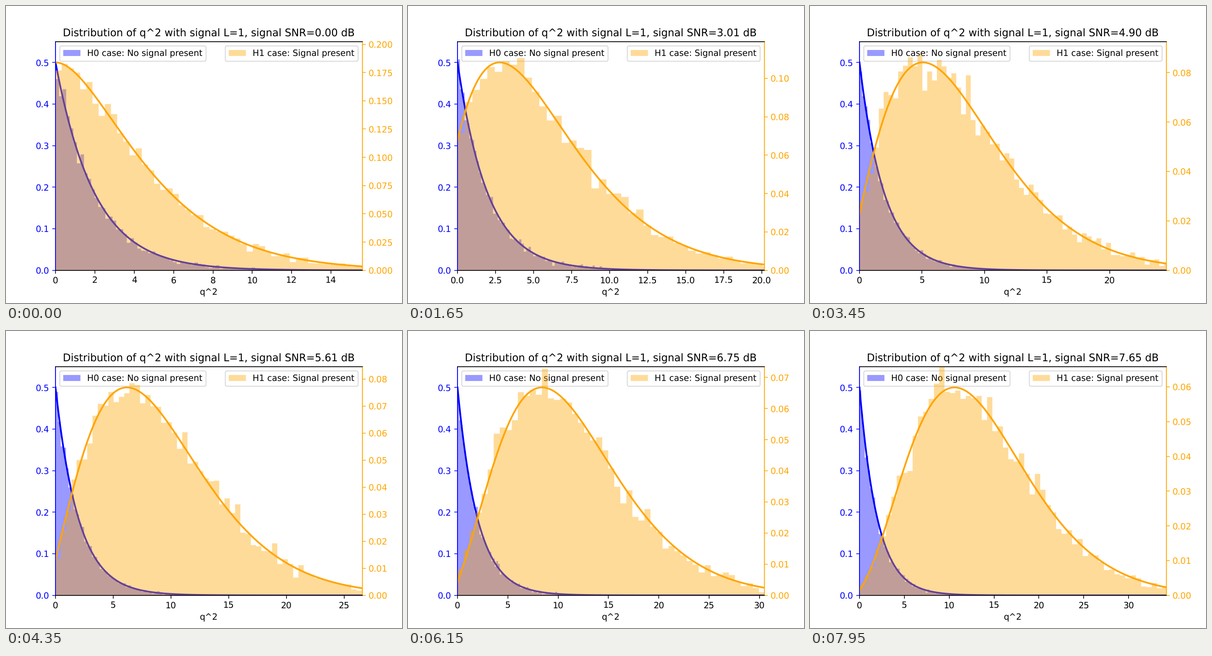
Animation of 864x648 px, one loop 8 s. Source, as a matplotlib script:

```python
import numpy as np
import matplotlib.pyplot as plt
from matplotlib.animation import FuncAnimation

# Sub-pixel placement keeps text widths and edges independent of the dpi.
plt.rcParams.update({'text.hinting': 'none', 'path.snap': False})

STEPS = 54
FRAMES_PER_STEP = 3
SAMPLES = 10_000
BINS = 100
HEADROOM = 1.1
grid = np.linspace(0, 90, 9001)


def noise_pdf(x):
    return 0.5 * np.exp(-x / 2)


def signal_pdf(x, power):
    """Noncentral chi-square density with two degrees of freedom."""
    return 0.5 * np.exp(-(x + power) / 2) * np.i0(np.sqrt(power * x))


def draw_histogram(rng, power):
    re, im = rng.normal(size=(2, SAMPLES))
    q2 = (re + np.sqrt(power)) ** 2 + im ** 2
    return np.histogram(q2, BINS, range=(0, q2.max()), density=True)


def make_state(step):
    snr = 1 + step / 11
    power = 2 * snr
    pdf = signal_pdf(grid, power)
    cdf = np.cumsum((pdf[1:] + pdf[:-1]) / 2) * grid[1]
    rng = np.random.default_rng(step)
    return dict(snr=snr,
                x_max=np.interp(0.99, cdf, grid[1:]),
                y_max=HEADROOM * pdf.max(),
                h0=draw_histogram(rng, 0),
                h1=draw_histogram(rng, power))


states = [make_state(step) for step in range(STEPS)]

fig, ax0 = plt.subplots(figsize=(6.4, 4.8), dpi=135)
ax1 = ax0.twinx()


def add_case(ax, color, label, loc):
    hist = ax.stairs(np.zeros(BINS), np.linspace(0, 1, BINS + 1), fill=True,
                     color=color, alpha=0.4, label=label)
    line, = ax.plot([], [], color=color, lw=2)
    ax.tick_params(axis='y', colors=color)
    ax.legend(loc=loc)
    return hist, line


hist0, line0 = add_case(ax0, 'blue', 'H0 case: No signal present', 'upper left')
hist1, line1 = add_case(ax1, 'orange', 'H1 case: Signal present', 'upper right')
for ax in (ax0, ax1):
    ax.spines['left'].set_color('blue')
    ax.spines['right'].set_color('orange')
ax0.set_ylim(0, HEADROOM * noise_pdf(0))
ax0.set_xlabel('q^2')
title = ax0.set_title('')


def update(frame):
    s = states[frame // FRAMES_PER_STEP]
    x = np.linspace(0, s['x_max'], 400)
    hist0.set_data(*s['h0'])
    hist1.set_data(*s['h1'])
    line0.set_data(x, noise_pdf(x))
    line1.set_data(x, signal_pdf(x, 2 * s['snr']))
    ax0.set_xlim(0, s['x_max'])
    ax1.set_ylim(0, s['y_max'])
    title.set_text('Distribution of q^2 with signal L=1, '
                   f'signal SNR={10 * np.log10(s["snr"]):.2f} dB')
    return hist0, hist1, line0, line1, title


anim = FuncAnimation(fig, update, frames=160, interval=50, repeat=True,
                     repeat_delay=0, blit=False)
plt.show()
```
